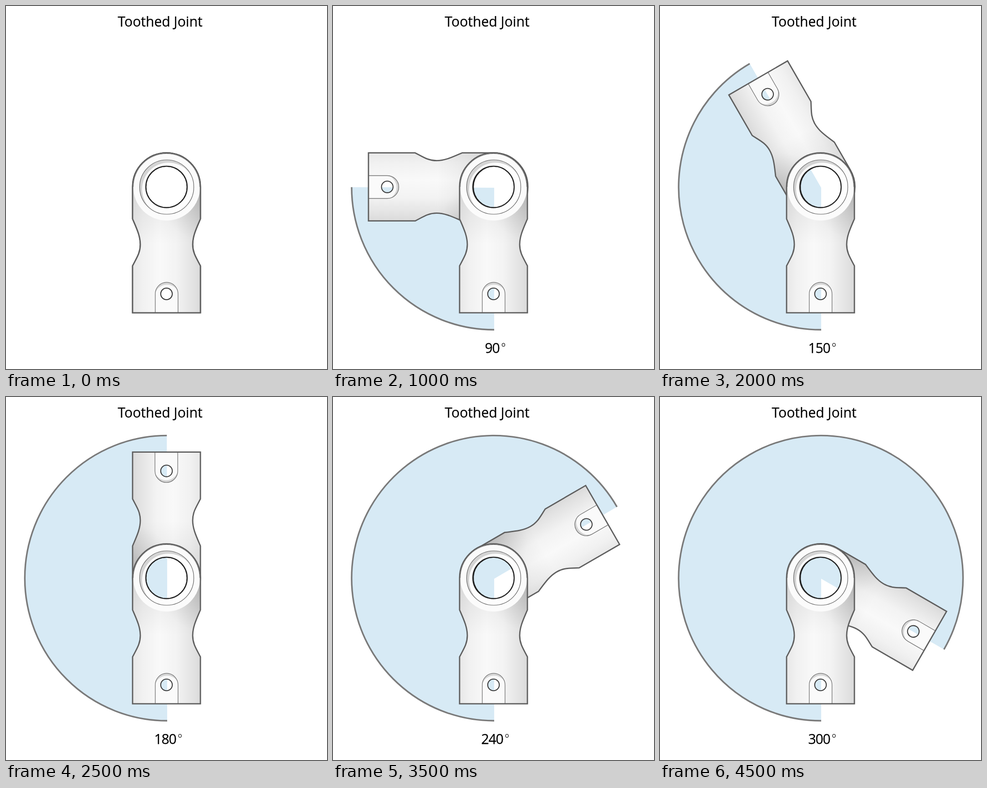
Animation of 705x795 px, one loop 6500 ms. Source, as an HTML page:

```html
<!DOCTYPE html>
<html lang="en">
<head>
<meta charset="utf-8">
<title>Toothed Joint</title>
<style>
  html, body { margin: 0; width: 100%; height: 100%; overflow: hidden; background: #fff; }
  svg { display: block; width: 705px; height: 795px; }
  text { font-family: "Trebuchet MS", "Open Sans", "Noto Sans", sans-serif; font-size: 30.1px; stroke: #000; stroke-width: .25; }
  #deg { font-size: 25px; font-weight: 300; stroke: none; }
</style>
</head>
<body>
<svg viewBox="0 0 705 795">
  <defs>
    <linearGradient id="tube">
      <stop offset="0" stop-color="#e8e8e8"/>
      <stop offset=".15" stop-color="#f1f1f1"/>
      <stop offset=".4" stop-color="#f9f9f9"/>
      <stop offset=".65" stop-color="#f3f3f3"/>
      <stop offset=".9" stop-color="#e2e2e2"/>
      <stop offset="1" stop-color="#dadada"/>
    </linearGradient>
    <linearGradient id="fade" gradientUnits="userSpaceOnUse" x1="0" y1="20" x2="0" y2="125">
      <stop offset="0" stop-opacity=".07"/>
      <stop offset="1" stop-opacity="0"/>
    </linearGradient>
    <radialGradient id="shade" gradientUnits="userSpaceOnUse" cx="76" cy="28" r="88">
      <stop offset="0" stop-opacity=".1"/>
      <stop offset="1" stop-opacity="0"/>
    </radialGradient>
    <path id="body" d="M-74.5 0A74.5 74.5 0 0 1 74.5 0V70C66 90 57.5 107 57.5 126S66 156 74.5 173V275.6H-74.5V173C-66 156 -57.5 145 -57.5 126S-66 90 -74.5 70Z"/>
    <path id="tab" d="M-24.7 275V234.5A25 25.5 0 0 1 25.3 234.5V275"/>
    <clipPath id="inTab"><use href="#tab"/></clipPath>
    <clipPath id="inRing"><circle cx=".5" cy=".3" r="59.5"/></clipPath>
    <mask id="holes" maskUnits="userSpaceOnUse" x="-90" y="-90" width="180" height="380">
      <rect x="-90" y="-90" width="180" height="380" fill="#fff"/>
      <circle r="45.4"/>
      <circle cy="234.3" r="12.7"/>
    </mask>
    <g id="arm">
      <g mask="url(#holes)">
        <use href="#body" fill="url(#tube)"/>
        <use href="#body" fill="url(#fade)"/>
        <use href="#body" fill="url(#shade)"/>
        <circle cx=".4" cy=".4" r="73.3" fill="#fbfbfb"/>
        <g clip-path="url(#inRing)">
          <circle r="62" fill="#d4d4d4"/>
          <circle cx="4.5" cy="5" r="58" fill="#fdfdfd"/>
        </g>
        <g clip-path="url(#inTab)">
          <rect x="-26" y="205" width="54" height="72" fill="#d6d6d6"/>
          <path d="M-26 277V241A26 26 0 0 1 28 241V277" fill="#fafafa"/>
        </g>
      </g>
      <g fill="none">
        <path d="M-72.8 0A72.8 72.8 0 0 1 72.8 0" stroke="#888"/>
        <circle cx=".5" cy=".3" r="59.5" stroke="#606060" stroke-width="1.2"/>
        <use href="#tab" stroke="#707070" stroke-width="1.3"/>
        <use href="#body" stroke="#5e5e5e" stroke-width="2.8"/>
        <circle r="45.4" stroke="#222" stroke-width="2.3"/>
        <circle cy="234.3" r="12.7" stroke="#3c3c3c" stroke-width="2.1"/>
      </g>
    </g>
  </defs>
  <rect width="705" height="795" fill="#fff"/>
  <text x="338.5" y="44.5" text-anchor="middle">Toothed Joint</text>
  <g id="sweep">
    <path id="wedge" fill="#d7eaf5"/>
    <path id="arc" fill="none" stroke="#7a7a7a" stroke-width="3.4"/>
    <text id="num" x="349.5" y="760" text-anchor="middle" letter-spacing="-1.2"></text>
    <text id="deg" y="757" text-anchor="middle">°</text>
  </g>
  <use id="back" href="#arm"/>
  <use href="#arm" transform="translate(352.5 396.2)"/>
</svg>
<script>
  const $ = id => document.getElementById(id);
  const LOOP = 6500, STEP = 500, CX = 353.2, CY = 396.7, R = 312.3;
  let shown = -1;

  // The joint clicks from 0 to 60 degrees, then on by 30 up to 300.
  function angleAt(t) {
    const n = Math.min(9, Math.floor(t / STEP));
    return n ? 30 + 30 * n : 0;
  }

  function draw(t) {
    const a = angleAt(t);
    if (a === shown) return;
    shown = a;
    const rad = a * Math.PI / 180;
    const x = CX - R * Math.sin(rad), y = CY + R * Math.cos(rad);
    const rim = `354 ${CY + R}A${R} ${R} 0 ${a > 180 ? 1 : 0} 1 ${x} ${y}`;
    $("sweep").setAttribute("visibility", a ? "visible" : "hidden");
    $("wedge").setAttribute("d", `M354 398L${rim}Z`);
    $("arc").setAttribute("d", "M" + rim);
    $("num").textContent = a;
    $("deg").setAttribute("x", 358.5 + 7.9 * String(a).length);
    const px = a % 180 ? 353.5 : 352.5;
    $("back").setAttribute("transform", `translate(${px} 396.2) rotate(${a})`);
  }

  const start = performance.now();
  function tick() {
    draw((performance.now() - start) % LOOP);
    requestAnimationFrame(tick);
  }
  tick();
</script>
</body>
</html>
```
